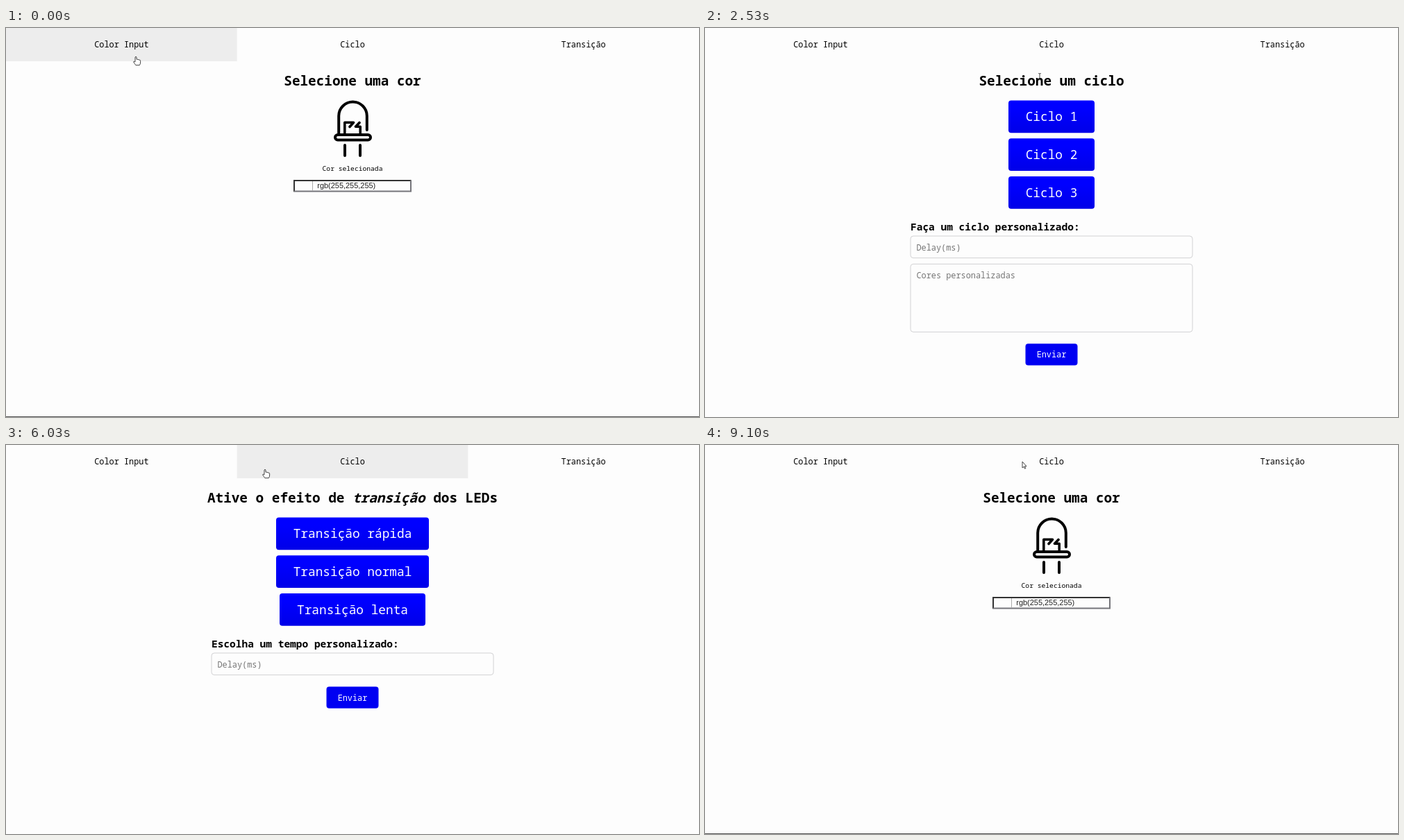
These frames come from a looping animation (998 by 561 pixels, 9.13 s). An HTML page:

```html
<!DOCTYPE html>
<html lang="pt">
<head>
<meta charset="utf-8">
<style>
html, body { margin: 0; width: 100%; height: 100%; overflow: hidden; background: #fdfdfd; }
svg { display: block; width: 998px; height: 561px; }
text { font: 11.88px "Noto Sans Mono", "DejaVu Sans Mono", monospace; fill: #000; }
.mid { text-anchor: middle; }
.title { font-size: 19.38px; font-weight: 700; }
.label { font-size: 14.5px; font-weight: 700; }
.big { font-size: 17.8px; }
.small { font-size: 9.67px; }
.white { fill: #fff; }
.hint { fill: #757575; }
.rgb { font: 10.95px "Liberation Sans", Arial, sans-serif; fill: #222; }
.field { fill: none; stroke: #d2d2d4; }
.led { fill: none; stroke: #000; stroke-width: 4; stroke-linecap: round; stroke-linejoin: round; }
.cursor { fill: #fff; stroke: #333; stroke-width: .9; stroke-linejoin: round; }
</style>
</head>
<body>
<svg viewBox="0 0 998 561">
  <defs>
    <linearGradient id="blue" x2="0" y2="1">
      <stop offset=".25" stop-color="#00f"/>
      <stop offset="1" stop-color="#0000e8"/>
    </linearGradient>
  </defs>
  <rect width="998" height="561" fill="#fdfdfd"/>
  <rect id="hover" width="332.67" height="48" fill="#ededed"/>
  <g id="nav"></g>
  <g id="color">
    <g class="led">
      <path d="M479.2 153V126.8a20.3 20.3 0 0 1 40.6 0V147"/>
      <rect x="474" y="154" width="51" height="7.4" rx="3.7"/>
      <path d="M488 169V184M510 169V184"/>
      <path stroke-width="3.6" d="M487.8 152V136.2H500.5L495 142.5M509 136.5L503.5 142.3H510.2V152"/>
    </g>
    <path d="M414 236.5V219H584L582 221H416V234.5Z" fill="#333"/>
    <path d="M414 236.5H584V219L582 221V234.5H416Z" fill="#75757a"/>
    <path d="M441.5 221V234.5" stroke="#aaa"/>
    <text class="rgb" x="448.3" y="231.3">rgb(255,255,255)</text>
  </g>
  <g id="cycle"></g>
  <g id="fade"></g>
  <path id="edge" d="M0 560.5H998" stroke="#555"/>
  <g id="pointer" class="cursor">
    <path id="arrow" d="M0 0V9L2.1 7.2L3.5 10.2L4.8 9.6L3.4 6.7H6Z"/>
    <path id="hand" d="M-1 1Q0 -.6 1 1V4.2Q2.2 3.4 3 4.7Q4.2 4 5 5.2Q6.6 4.8 6.6 6.4V9Q6.4 11 5.4 12.6H-.2Q-1.5 10.5-3.4 8Q-3.4 6.2-1 7.8Z"/>
    <path id="beam" fill="none" d="M-1.8 -4.5Q0 -4.8 0 -3.5Q0 -4.8 1.8 -4.5M0 -3.5V4M-1.8 5Q0 5.2 0 4Q0 5.2 1.8 5"/>
  </g>
</svg>
<script>
const LOOP = 9130, TAB = 998 / 3;
const $ = id => document.getElementById(id);
const text = (str, x, y, cls = "mid") => `<text class="${cls}" x="${x}" y="${y}">${str}</text>`;
const title = str => text(str, 499, 83.3, "mid title");
const button = (str, y, w, h, base, cls = "big", fill = "url(#blue)") =>
  `<rect x="${499 - w / 2}" y="${y}" width="${w}" height="${h}" rx="4" fill="${fill}"/>` +
  text(str, 499, base, "mid white " + cls);
const field = (hint, y, h) =>
  `<rect class="field" x="296" y="${y}" width="406" height="${h}" rx="4"/>` +
  text(hint, 304.5, y + 20.5, "hint");
const send = y => button("Enviar", y, 75, 31.2, y + 20.2, "", "#0000f2");
const stack = (names, widths) =>
  names.map((n, i) => button(n, 104.5 + i * 54.8, widths[i], 46.7, 134 + i * 54.8)).join("");

$("nav").innerHTML = ["Color Input", "Ciclo", "Transição"]
  .map((n, i) => text(n, TAB * (i + .5), 28)).join("");
$("color").innerHTML += title("Selecione uma cor") + text("Cor selecionada", 499, 206.3, "mid small");
$("cycle").innerHTML = title("Selecione um ciclo") +
  stack(["Ciclo 1", "Ciclo 2", "Ciclo 3"], [124, 124, 124]) +
  text("Faça um ciclo personalizado:", 296, 291.5, "label") +
  field("Delay(ms)", 300, 31.6) + field("Cores personalizadas", 340.4, 98) + send(455.2);
$("fade").innerHTML =
  title('Ative o efeito de <tspan font-style="italic">transição</tspan> dos LEDs') +
  stack(["Transição rápida", "Transição normal", "Transição lenta"], [220, 220, 210]) +
  text("Escolha um tempo personalizado:", 296, 291.5, "label") +
  field("Delay(ms)", 300, 31.6) + send(348.6);

// pointer stops: time, x, y
const path = [
  [0, 187, 41], [450, 195, 40], [800, 300, 56], [1070, 387, 54], [1450, 480, 34],
  [2050, 484, 32], [2530, 482, 70], [2900, 520, 84], [3500, 770, 36], [4250, 790, 36],
  [4600, 786, 41], [4850, 740, 58], [5150, 560, 58], [5550, 380, 36], [6030, 373, 35],
  [6450, 370, 36], [7070, 293, 66], [7350, 250, 60], [7750, 175, 36], [8300, 180, 36],
  [8650, 270, 54], [9020, 430, 50], [9100, 457, 24], [LOOP, 463, 22]
];
// page changes: start time, page
const pages = [[0, "color"], [1950, "cycle"], [4150, "fade"], [6250, "cycle"], [8050, "color"]];

function place(t) {
  const i = path.findIndex(p => p[0] > t);
  const [t0, x0, y0] = path[i - 1], [t1, x1, y1] = path[i];
  const u = (t - t0) / (t1 - t0), k = u * u * (3 - 2 * u);
  return [x0 + (x1 - x0) * k, y0 + (y1 - y0) * k];
}

const show = (id, on) => $(id).style.display = on ? "" : "none";

function draw(now) {
  const t = now % LOOP;
  const page = pages.filter(p => p[0] <= t).pop()[1];
  for (const id of ["color", "cycle", "fade"]) show(id, id === page);

  const [x, y] = place(t);
  const [hx, hy] = place(Math.max(0, t - 80)); // hover lags behind the pointer
  const over = hy < 48;
  const half = { color: 98, cycle: 104, fade: 209 }[page];
  const onTitle = y > 66 && y < 88 && Math.abs(x - 499) < half;
  show("hover", over);
  $("hover").setAttribute("x", Math.floor(hx / TAB) * TAB);
  show("hand", over);
  show("beam", !over && onTitle);
  show("arrow", !over && !onTitle);
  $("pointer").setAttribute("transform", `translate(${x} ${y})`);
  show("edge", t < 50 || t >= 9090);
  requestAnimationFrame(() => draw(performance.now() - start));
}

const start = performance.now();
draw(0);
</script>
</body>
</html>
```
